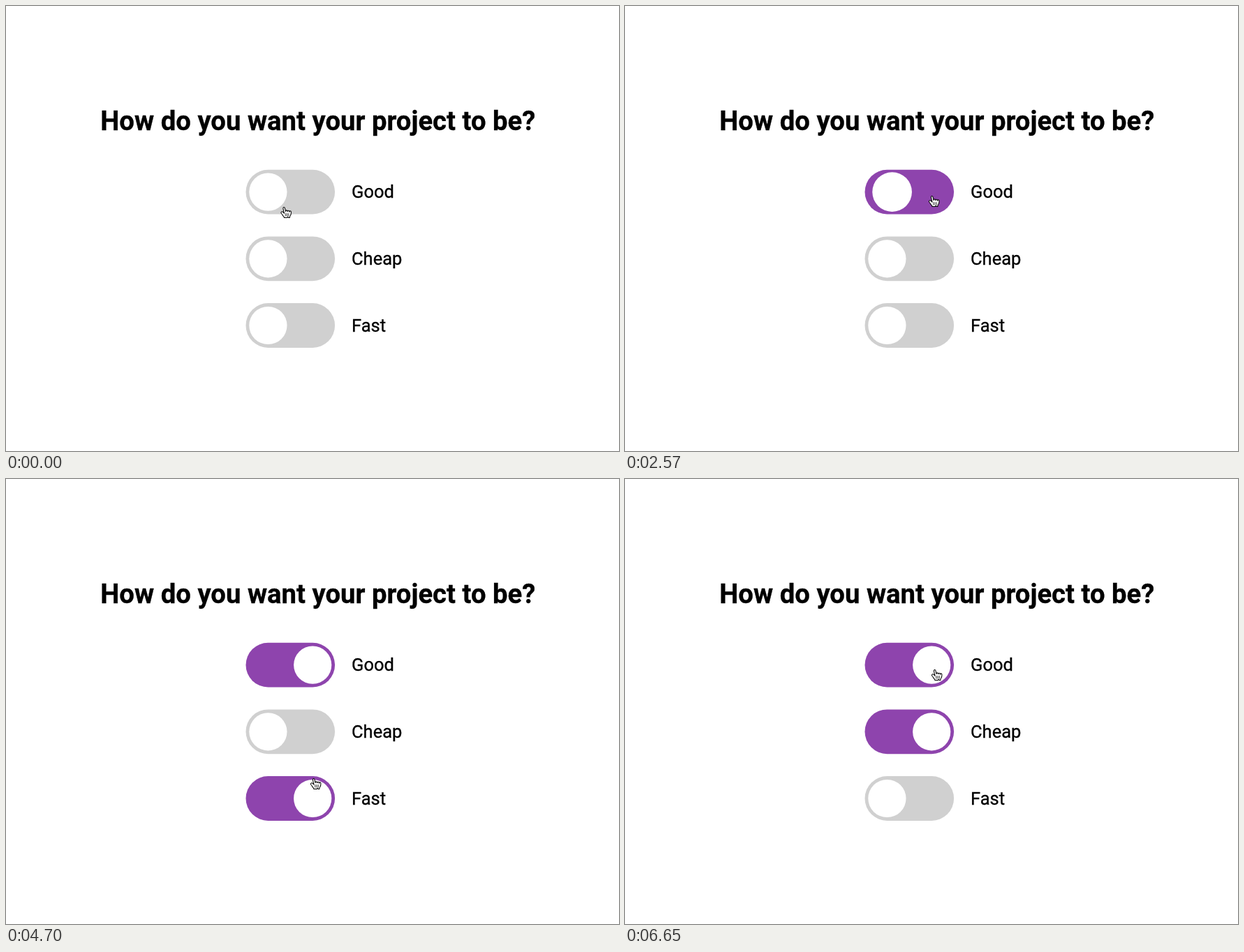
Recreate the animation shown at these times as an HTML page with a canvas. Size 878x638 px, loop 6.74 s.

```html
<!DOCTYPE html>
<html lang="en">
<head>
<meta charset="utf-8">
<title>Project toggles</title>
<style>
  html, body { margin: 0; width: 100%; height: 100%; overflow: hidden; background: #fff; }
  canvas { display: block; width: 878px; height: 638px; }
</style>
</head>
<body>
<canvas id="stage"></canvas>
<script>
const W = 878, H = 638;
const LOOP = 6740, STEPS = 76, STEP = LOOP / STEPS;  // motion advances in even steps
const UNIT = 1.595;                                  // one layout pixel on the stage
const LEFT = 343.5, TOP = 234.7, PITCH = 60 * UNIT;
const SLIDE = 300;                                   // ms for a knob to cross
const PACE = 2.6;                                    // pointer ms per pixel
const LABELS = ['Good', 'Cheap', 'Fast'];

// Clicks in ms and the switch each one hits
const CLICKS = [[675, 0], [1917, 0], [2538, 0], [3336, 1], [4045, 2], [5109, 1], [6173, 0]];

// Pointer stops: arrival in ms, x, y
const STOPS = [
  [0, 393.5, 288], [350, 401, 286], [1500, 411.5, 369], [1770, 425, 257],
  [2220, 430, 313], [2390, 435, 272], [2840, 422, 372], [3720, 415, 474.5],
  [3900, 418, 479], [4430, 420, 488], [4700, 436, 429], [4970, 429, 380],
  [6030, 439, 273]
];

const HAND = new Path2D('M11.3 20.4C10.4 19 9.9 18 8.6 16.5C7.8 15.2 9.4 13.4 11.3 15.1' +
  'L12.7 16.6L11.3 10.6C10.8 8.2 13 7.6 13.7 10L14.7 14.2C14.6 12 17.2 12.1 17.2 14.4' +
  'C17.2 12.2 19.7 12.4 19.7 14.8C19.9 13 22.1 13.1 22.1 15.2C22.1 18 21.9 18.6 21 19.8' +
  'C20 21 20 21.5 20.1 22.7L18.6 22.6L17.7 21.4L16.6 22.7L12.6 22.7L12.4 21.4Z');
const CREASES = new Path2D('M14.4 17V20.4M16.5 17V20.4M18.6 17V20.4');

const canvas = document.getElementById('stage');
const ctx = canvas.getContext('2d');
const ratio = window.devicePixelRatio || 1;
canvas.width = W * ratio;
canvas.height = H * ratio;

const mix = (a, b, p) => a + (b - a) * p;
const smooth = p => p * p * (3 - 2 * p);

function text(str, x, y, weight, size) {
  ctx.font = `${weight} ${size * UNIT}px Roboto, sans-serif`;
  ctx.fillStyle = ctx.strokeStyle = '#000';
  ctx.lineWidth = 0.3;
  ctx.fillText(str, x, y);
  ctx.strokeText(str, x, y);
}

// Only two switches may be on: a third one turns off the switch before it.
function switchesAt(t) {
  const list = LABELS.map(() => ({ on: false, since: -SLIDE }));
  const flip = (i, at) => { list[i] = { on: !list[i].on, since: at }; };
  for (const [at, i] of CLICKS) {
    if (at > t) break;
    flip(i, at);
    if (list.every(s => s.on)) flip((i + 2) % 3, at);
  }
  return list;
}

function drawSwitch({ on, since }, index, t) {
  const p = Math.min(1, (t - since) / SLIDE);
  const pos = on ? p : 1 - p;
  const grow = 1.2 - 0.2 * Math.abs(2 * p - 1);
  const y = TOP + index * PITCH;
  ctx.fillStyle = on ? '#8e44ad' : '#d0d0d0';
  ctx.beginPath();
  ctx.roundRect(LEFT, y, 80 * UNIT, 40 * UNIT, 20 * UNIT);
  ctx.fill();
  ctx.fillStyle = '#fff';
  ctx.beginPath();
  ctx.arc(LEFT + (20 + 40 * pos) * UNIT, y + 20 * UNIT, 17 * UNIT * grow, 0, 2 * Math.PI);
  ctx.fill();
  text(LABELS[index], 495, y + 40.5, 400, 16);
}

// The pointer rests, then leaves just in time to reach its next stop.
function pointerAt(t) {
  const next = STOPS.findIndex(s => s[0] > t);
  if (next < 0) return STOPS.at(-1).slice(1);
  const [t0, x0, y0] = STOPS[next - 1], [t1, x1, y1] = STOPS[next];
  const glide = Math.min(t1 - t0, PACE * Math.hypot(x1 - x0, y1 - y0));
  const p = smooth(Math.max(0, 1 - (t1 - t) / glide));
  return [mix(x0, x1, p), mix(y0, y1, p)];
}

function drawPointer(t) {
  ctx.save();
  ctx.translate(...pointerAt(t));
  ctx.scale(1.06, 1.06);
  ctx.translate(-8, -8);
  ctx.lineJoin = ctx.lineCap = 'round';
  ctx.fillStyle = '#fff';
  ctx.strokeStyle = '#000';
  ctx.lineWidth = 1;
  ctx.fill(HAND);
  ctx.stroke(HAND);
  ctx.lineWidth = 0.75;
  ctx.stroke(CREASES);
  ctx.restore();
}

function draw(now) {
  const t = STEP * Math.min(STEPS - 1, Math.floor((now % LOOP + 8) / STEP));
  ctx.setTransform(ratio, 0, 0, ratio, 0, 0);
  ctx.fillStyle = '#fff';
  ctx.fillRect(0, 0, W, H);
  text('How do you want your project to be?', 135.3, 178, 700, 24);
  switchesAt(t).forEach((s, i) => drawSwitch(s, i, t));
  drawPointer(t);
}

let start;
function tick(now) {
  start ??= now;
  draw(now - start);
  requestAnimationFrame(tick);
}
requestAnimationFrame(tick);
</script>
</body>
</html>
```
